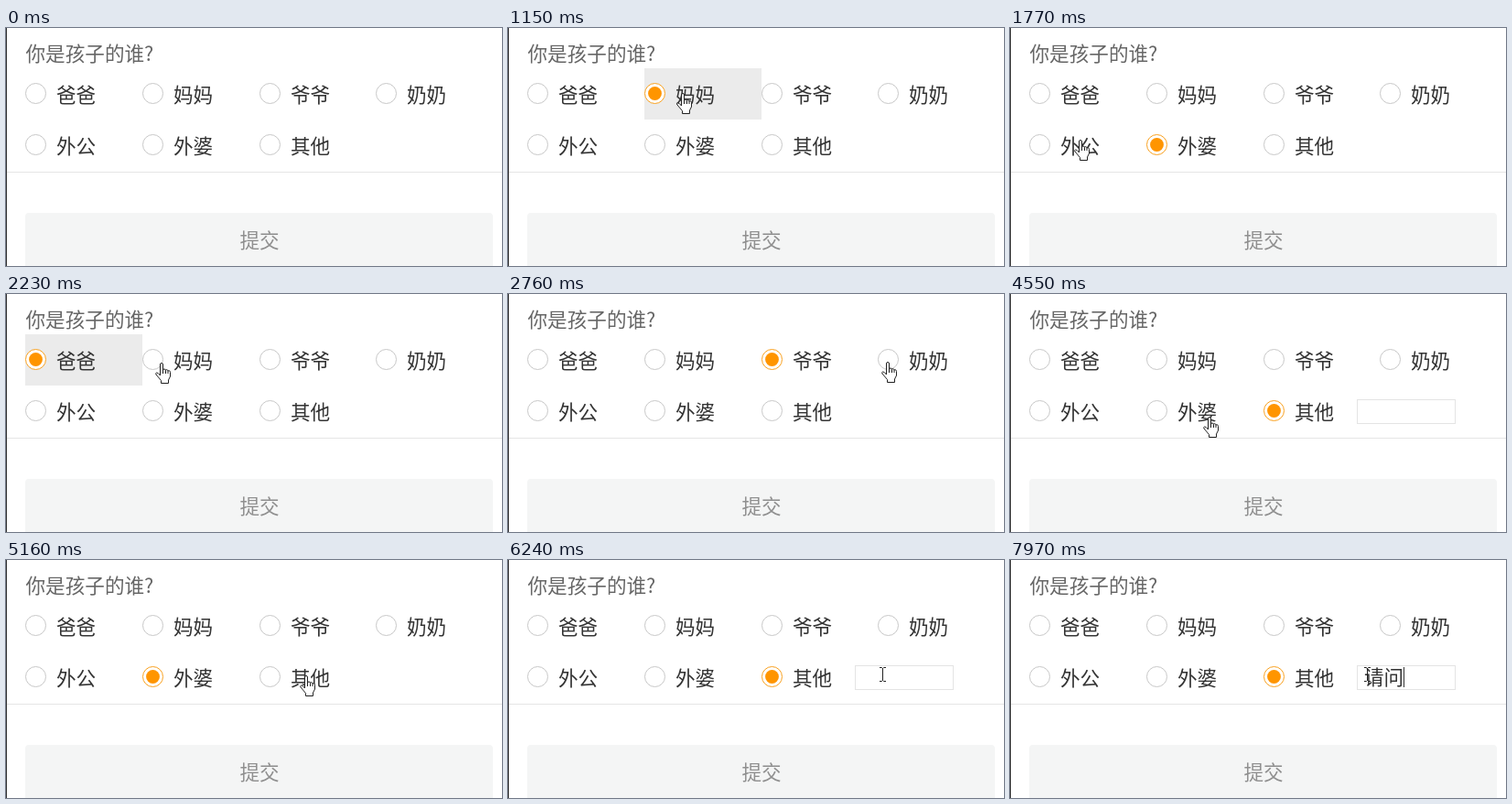
These frames come from a looping animation (542x260 px, 8000 ms). An HTML page:

```html
<!DOCTYPE html>
<html lang="zh-CN">
<head>
<meta charset="utf-8">
<style>
html, body { margin: 0; width: 100%; height: 100%; overflow: hidden; background: #fff; }
svg { display: block; width: 542px; height: 260px; font: 21.6px "Noto Sans CJK SC", "Noto Sans CJK", sans-serif; fill: #333; }
.ring { fill: #fff; stroke: #c8c8c8; }
.dot, .hi { visibility: hidden; }
.dot { fill: #ff9500; }
.hi { fill: #ebebeb; }
.on .ring { stroke: #f9a11f; }
.on .dot, .tap .hi { visibility: visible; }
.box { fill: #fff; stroke: #e4e4e4; }
#ime { font-size: 15px; }
</style>
</head>
<body>
<svg viewBox="0 0 542 260">
  <rect width="1" height="260" fill="#333"/>
  <text x="21.5" y="36" fill="#666">你是孩子的谁?</text>
  <path d="M1 157.5H542" stroke="#e5e5e5"/>
  <rect x="21" y="202" width="511" height="70" rx="4" fill="#f4f5f5"/>
  <text x="277" y="240" text-anchor="middle" fill="#8f8f8f">提交</text>
  <g id="options"></g>
  <g id="field">
    <rect class="box" x="379.5" y="115.5" width="107" height="26"/>
    <text id="typed" x="387" y="136">请问</text>
    <rect id="caret" y="117" width="1" height="22"/>
  </g>
  <g id="ime">
    <rect class="box" x="388.5" y="144.5" width="170" height="51"/>
    <text x="396" y="164">qing'wen</text>
    <text x="396" y="187">1.请问 2.请 3.轻</text>
  </g>
  <g id="cursor" stroke="#222">
    <path id="hand" fill="#fff" stroke-linejoin="round" d="M5.5 14V2Q5.5.5 7 .5T8.5 2V8Q8.5 7 10 7T11.5 8.5Q11.5 7.5 12.8 7.7T14 9.5Q14 8.5 15.2 8.7T16.5 10.5V15L14.5 19V22.5H6.5V19.5L1 13Q0 11.5 1.5 11T5.5 14ZM8.5 8V12M11.5 8.5V12M14 9.5V12"/>
    <path id="beam" fill="none" d="M0 .5H2.5L3.5 1.5L4.5 .5H7M3.5 1V15M0 15.5H2.5L3.5 14.5L4.5 15.5H7"/>
  </g>
</svg>
<script>
const LOOP = 8000, GLIDE = 300, REST = 80, TAP = 160;
const $ = id => document.getElementById(id);
const show = (id, on) => $(id).style.display = on ? "" : "none";

const labels = ["爸爸", "妈妈", "爷爷", "奶奶", "外公", "外婆", "其他"];
$("options").innerHTML = labels.map((label, i) => {
  const x = Math.round(21 + i % 4 * 127.75), y = i < 4 ? 44 : 100;
  return `<g transform="translate(${x} ${y})">
    <rect class="hi" width="128" height="56"/>
    <circle class="ring" cx="11.5" cy="27.5" r="11"/>
    <circle class="dot" cx="11.5" cy="27.5" r="7.4"/>
    <text x="34" y="37">${label}</text></g>`;
}).join("");
const options = [...$("options").children];

// Pointer stops: time, x, y and the option clicked then; the pointer arrives REST earlier
const stops = [
  [130, 491, 282], [360, 323, 150],
  [1150, 184, 70, "妈妈"], [1530, 188, 124, "外婆"], [1850, 70, 122, "外公"],
  [2080, 62, 68, "爸爸"], [2310, 163, 75, "妈妈"], [2540, 318, 72, "爷爷"],
  [2840, 408, 74, "奶奶"], [3350, 322, 122, "其他"],
  [4060, 379, 131], [4630, 211, 134, "外婆"], [5240, 321, 126, "其他"],
  [5690, 426, 124], [6320, 406, 117], [7650, 387, 117]
];

function pointer(t) {
  let [last, x, y] = stops[0];
  for (const [time, toX, toY] of stops.slice(1)) {
    const end = time - REST, start = Math.max(last, end - GLIDE);
    const p = Math.min(1, Math.max(0, (t - start) / (end - start)));
    const eased = 1 - (1 - p) ** 3;
    x += (toX - x) * eased;
    y += (toY - y) * eased;
    last = time;
  }
  return [Math.round(x), Math.round(y)];
}

function draw(t) {
  const [clicked, , , label] = stops.filter(s => s[3] && s[0] <= t).pop() || [];
  options.forEach((el, i) => {
    const on = labels[i] === label;
    el.classList.toggle("on", on);
    el.classList.toggle("tap", on && t < clicked + TAP);
  });

  const open = label === "其他", done = t >= 7880;
  show("field", open);
  show("typed", done);
  show("caret", done || t >= 5610 && t < 5780);
  $("caret").setAttribute("x", done ? 430 : 386);
  show("ime", t >= 7180 && !done);

  const [x, y] = pointer(t), typing = open && x > 380;
  $("cursor").setAttribute("transform", `translate(${x} ${y})`);
  show("hand", !typing);
  show("beam", typing);
}

function frame() {
  draw(performance.now() % LOOP);
  requestAnimationFrame(frame);
}
frame();
</script>
</body>
</html>
```
